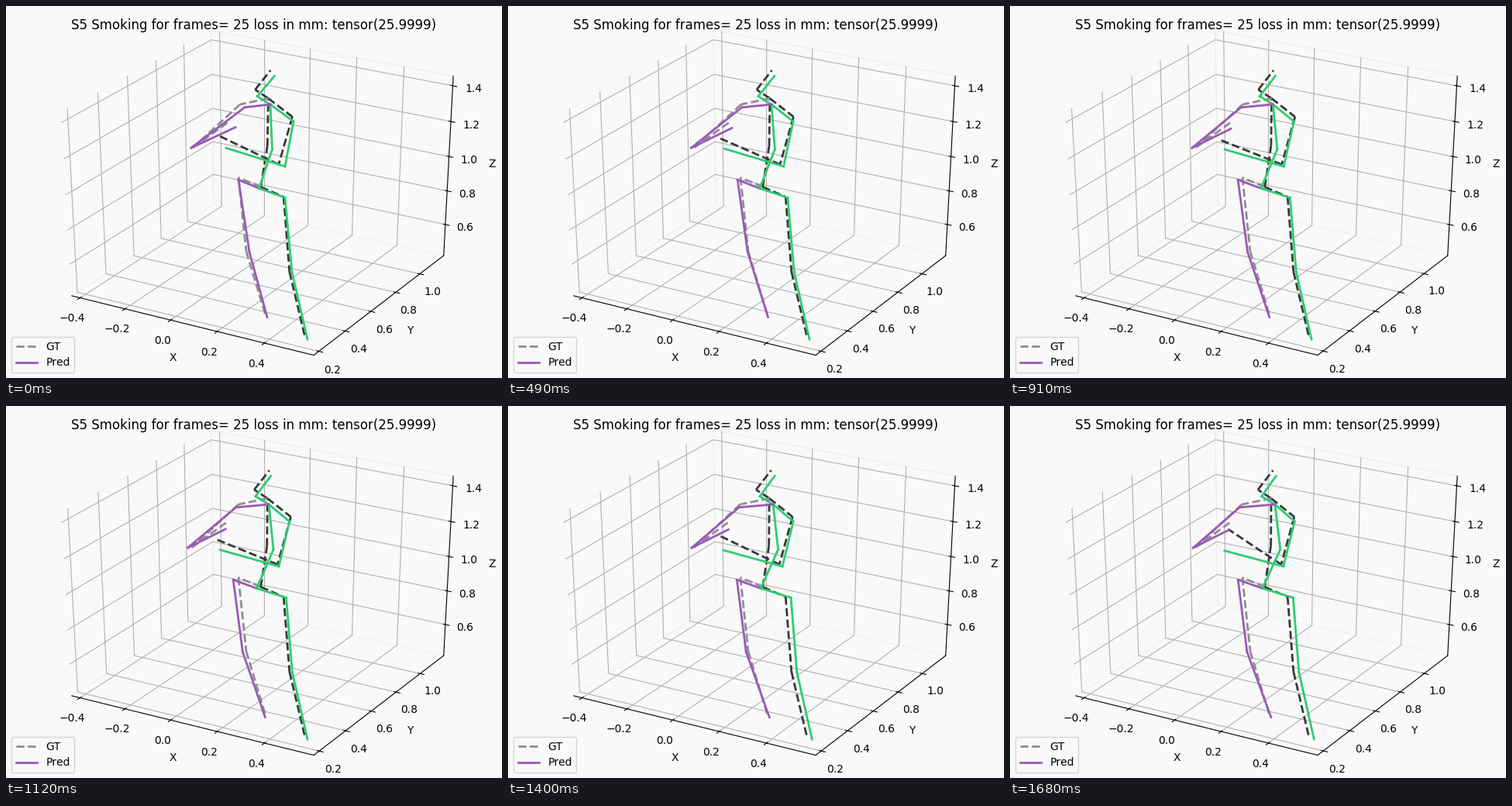
A matplotlib script for the animation above (1.75 s loop, 640 by 480 pixels).

```python
import numpy as np
import matplotlib.pyplot as plt
from matplotlib.animation import FuncAnimation
from matplotlib.lines import Line2D

W, H, DPI = 640, 480, 100
FRAMES, STEP_MS = 25, 70
BG = "#f9f9f9"

plt.rcParams["font.family"] = "DejaVu Sans"
plt.rcParams["text.kerning_factor"] = 6
fig = plt.figure(figsize=(W / DPI, H / DPI), dpi=DPI, facecolor=BG)
ax = fig.add_axes([0, 0, 1, 1])
ax.set_xlim(0, W)
ax.set_ylim(H, 0)
ax.axis("off")

# ---- perspective view of a unit cube centred on the origin ----
ELEV, AZIM, DIST = np.radians(30), np.radians(-60), 10
VIEW = np.array([np.cos(ELEV) * np.cos(AZIM), np.cos(ELEV) * np.sin(AZIM), np.sin(ELEV)])
RIGHT = np.array([-np.sin(AZIM), np.cos(AZIM), 0])
UP = np.cross(VIEW, RIGHT)


def project(points):
    p = np.atleast_2d(points).astype(float)
    depth = DIST - p @ VIEW
    x = (p @ RIGHT / depth + 0.095) / 0.185 * W
    y = H - (p @ UP / depth + 0.095) / 0.185 * H
    return x, y


def line(points, **style):
    return ax.plot(*project(points), **style)[0]


DELTA = 1 / 12
E = 0.5 + DELTA / 4
PER_POINT = 48 / (72 * (W + H) / DPI)
TICK_PAD = E + 11.5 * PER_POINT * DELTA
NAME_PAD = E + 25 * PER_POINT * DELTA
OUT, IN = E + 0.2 * DELTA, E - 0.1 * DELTA

# grid path, tick and label anchor at unit position t; first tick and axis centre
AXES = {
    "X": dict(
        grid=lambda t: [(t, -E, -E), (t, E, -E), (t, E, E)],
        tick=lambda t: [(t, -OUT, -E), (t, -IN, -E)],
        at=lambda t, d: (t, -d, -d),
        first=-0.4, centre=0.0835),
    "Y": dict(
        grid=lambda t: [(E, t, -E), (-E, t, -E), (-E, t, E)],
        tick=lambda t: [(OUT, t, -E), (IN, t, -E)],
        at=lambda t, d: (d, t, -d),
        first=0.2, centre=0.683),
    "Z": dict(
        grid=lambda t: [(-E, -E, t), (-E, E, t), (E, E, t)],
        tick=lambda t: [(OUT, E, t), (IN, E, t)],
        at=lambda t, d: (d, d, t),
        first=0.6, centre=0.933),
}

# wall outlines
line([(-E, -E, -E), (-E, E, -E), (-E, E, E), (-E, -E, E)], color="#f5f5f5", lw=1, zorder=1)
line([(-E, -E, -E), (-E, E, -E), (E, E, -E), (E, -E, -E)], color="#f2f2f2", lw=1, zorder=1)
line([(-E, E, -E), (-E, E, E), (E, E, E), (E, E, -E)], color="#eeeeee", lw=1, zorder=1)


def make_marks(first):
    marks = []
    for value in first + 0.2 * np.arange(5):
        grid, = ax.plot([], [], color="#b0b0b0", lw=0.8, zorder=2)
        tick, = ax.plot([], [], color="k", lw=0.8, zorder=3)
        text = f"{abs(value):.1f}"
        if value < -0.01:
            text = "\u2212" + text
        marks.append((value, grid, tick, ax.text(0, 0, text, size=10, ha="center", va="top")))
    return marks


def place_marks(name, shift=0):
    spec = AXES[name]
    for value, grid, tick, label in spec["marks"]:
        t = value - spec["centre"] + shift
        grid.set_data(*project(spec["grid"](t)))
        tick.set_data(*project(spec["tick"](t)))
        x, y = project(spec["at"](t, TICK_PAD))
        label.set_position((x[0], y[0]))


for name, spec in AXES.items():
    line([spec["at"](-E, E), spec["at"](E, E)], color="k", lw=0.8, zorder=3)
    x, y = project(spec["at"](0, NAME_PAD))
    ax.text(x[0], y[0], name, size=10, ha="center", va="center")
    spec["marks"] = make_marks(spec["first"])
    place_marks(name)

ax.text(W / 2, 30.07, "S5 Smoking for frames= 25 loss in mm: tensor(25.9999)",
        size=12, ha="center", va="baseline")

# ---- skeletons: legs grow from the root, arms from the neck ----
ROOT, NECK = 0, 2

# opening pose: x, y
TRUTH = {
    "r_leg": [(300, 221.3), (310, 316.5), (335, 399.5)],
    "l_leg": [(358.2, 246.3), (365.8, 343), (386.2, 428.7)],
    "trunk": [(328.7, 233.5), (337.3, 180.5), (338.5, 119.2), (321.5, 108), (341.3, 83)],
    "l_arm": [(369.5, 143), (351.8, 204.5), (276, 168)],
    "r_arm": [(302, 127), (241.5, 182.5), (289.5, 148)],
}

# opening pose and sideways drift: x, y, drift
PRED = {
    "r_leg": [(300, 224.3, -9), (314, 317, -11.5), (337, 401.5, -3.5)],
    "l_leg": [(360, 247.3, 2), (369, 343.3, 0.5), (389, 430, 0)],
    "trunk": [(326.5, 235.3, -4), (343.5, 185, 2), (341, 127, -2.5), (324.3, 116.5, -3), (346.5, 90.3, -6.5)],
    "l_arm": [(371, 149, -7), (360, 207, -10.5), (284, 183.2, -10.5)],
    "r_arm": [(308, 130.8, -15), (239, 183, -6), (296, 156.5, -17)],
}


def smoothstep(a, b, x):
    u = np.clip((x - a) / (b - a), 0, 1)
    return u * u * (3 - 2 * u)


def truth_pose(t):
    """Slow lean to the left while the left hand dips, then lifts."""
    pose = {}
    root_y = TRUTH["trunk"][ROOT][1]
    for limb, points in TRUTH.items():
        p = np.array(points, float)
        lean = 0.013 * np.maximum(root_y - p[:, 1], 0)
        if limb.endswith("arm"):
            lean += 1.5
        p[:, 0] -= lean * t ** 0.7
        pose[limb] = p
    pose["l_arm"][-1] += 45 * t * t * (t - 0.83) * np.array([1, -1.2])
    return pose


def pred_pose(t):
    """Each joint drifts, the whole body steps right late, the hands sink."""
    pose = {}
    step = 3.3 * smoothstep(0.66, 0.84, t)
    for limb, points in PRED.items():
        p = np.array(points, float)
        p[:, 0] += p[:, 2] * t ** 0.7 + step
        if limb.endswith("arm"):
            p[-1, 1] += 3.5 * t
        pose[limb] = p[:, :2]
    return pose


def bones(pose):
    trunk = pose["trunk"]
    for limb, points in pose.items():
        if limb != "trunk":
            start = trunk[ROOT if limb.endswith("leg") else NECK]
            points = np.vstack([start, points])
        for a, b in zip(points, points[1:]):
            yield limb, a, b


def make_lines(pose, right, left, dash, zorder):
    return [ax.plot([], [], color=right if limb[0] == "r" else left, lw=2, ls=dash, zorder=zorder)[0]
            for limb, _, _ in bones(pose)]


def set_pose(lines, pose):
    for art, (_, a, b) in zip(lines, bones(pose)):
        art.set_data(*zip(a, b))


truth_lines = make_lines(truth_pose(0), "#8e8e8e", "#383838", "--", 4)
pred_lines = make_lines(pred_pose(0), "#9b59b6", "#2ecc71", "-", 5)

ax.legend(handles=[Line2D([], [], color="#8e8e8e", lw=2, ls="--", label="GT"),
                   Line2D([], [], color="#9b59b6", lw=2, label="Pred")],
          loc="lower left", facecolor=BG)


def update(i):
    t = i / (FRAMES - 1)
    place_marks("Y", 0.004 * t)
    set_pose(truth_lines, truth_pose(t))
    set_pose(pred_lines, pred_pose(t))
    return []


anim = FuncAnimation(fig, update, frames=FRAMES, interval=STEP_MS, repeat=True, repeat_delay=0)
plt.show()
```
